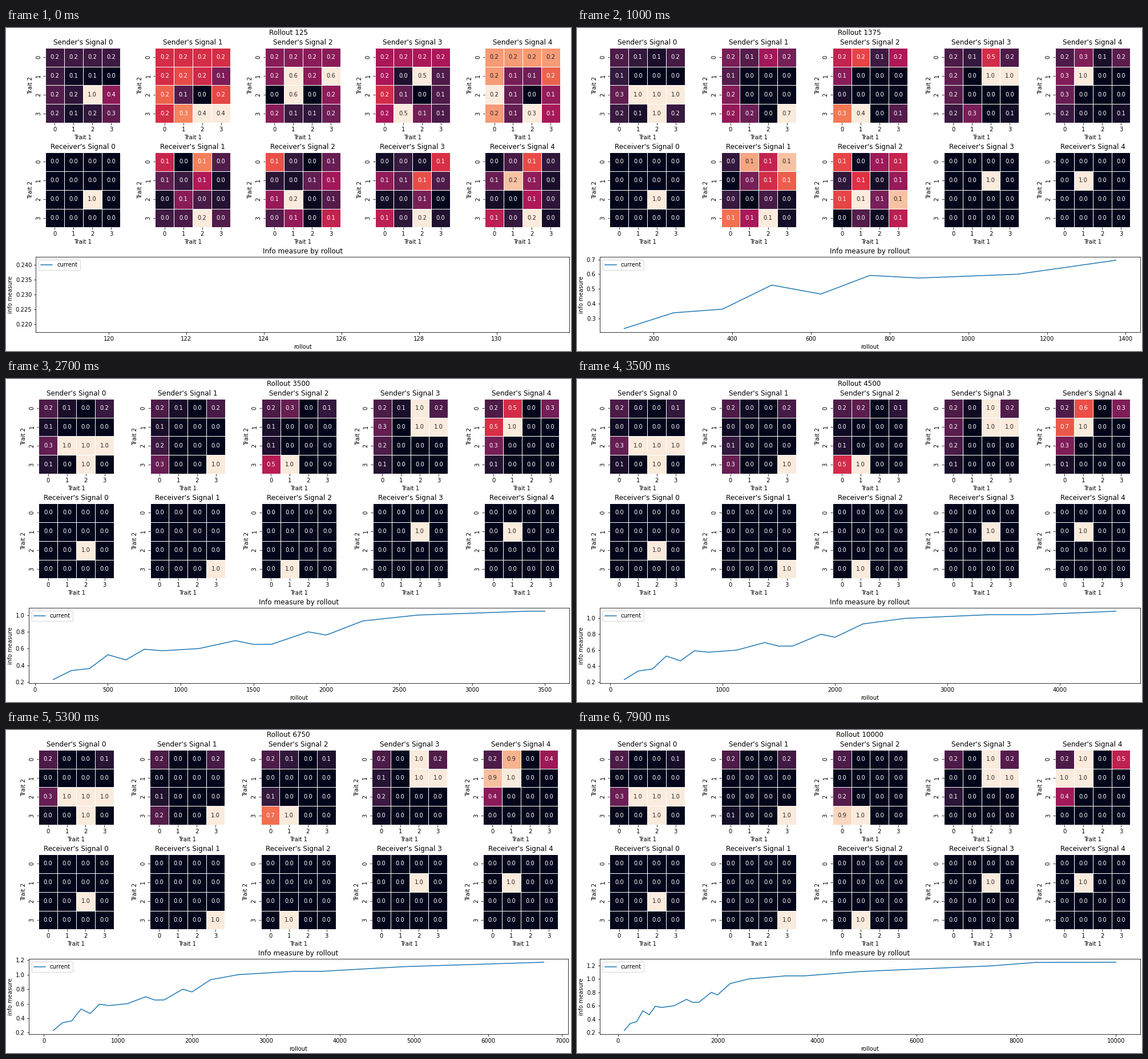
Animation, 990 px wide and 566 px high, one loop 8000 ms. Source, as a matplotlib script:

```python
import numpy as np
import matplotlib.pyplot as plt
from matplotlib.animation import FuncAnimation
from matplotlib.collections import LineCollection
from matplotlib.colors import LinearSegmentedColormap
from matplotlib.transforms import Affine2D

W, H, DPI = 990, 566, 72
FRAMES, INTERVAL, STEP = 80, 100, 125
SIGNALS, N, SIDE, GAP = 5, 4, 131.6, 28
CELL = SIDE / N
ROW_TOPS = (34.6, 217.8)
CHART_TOP, LEFT_EDGE, RIGHT_EDGE, DIGIT = 401.0, 39.7, 987.2, 6.36

plt.rcParams.update({"font.family": "DejaVu Sans", "font.size": 10})
ROCKET = LinearSegmentedColormap.from_list("warm", [
    "#03051a", "#35193e", "#701f57", "#ad1759",
    "#e13342", "#f37651", "#f6b48f", "#faebdd"])

# Each signal ends up naming one home cell, settled from a given frame on.
HOME = [(2, 2), (3, 3), (3, 1), (1, 2), (1, 1)]
SETTLED = [0, 15, 17, 3, 5]

# Inner cells: the signal leading at first, and the one that wins.
LEADER = [[2, 3, 2], [2, 0, 0], [3, 1, 1]]
LEAD_SHARE = [.38, .37, .58, .47, .2]
OWNER = [[4, 3, 3], [0, 0, 0], [2, 0, 1]]

# Edge cells: slow wins as (owner, rival, duration), or a lasting mixture
# as (signals in use at first, final shares).
SLOW = {(0, 1): (4, 2, 65), (0, 2): (3, 1, 24),
        (1, 0): (4, 3, 62), (3, 0): (2, 1, 85)}
MIXED = {(0, 0): ([1, 1, 1, 1, 1], [.2, .2, .2, .2, .2]),
         (0, 3): ([1, 1, 1, 1, 1], [.06, .17, .02, .22, .48]),
         (2, 0): ([1, 1, 0, 1, 1], [.27, 0, .22, .12, .4])}

# Bends of the info curve: frame -> value.
INFO_BENDS = {0: .23, 1: .337, 2: .362, 3: .526, 4: .465, 5: .592, 6: .574,
              8: .6, 10: .695, 11: .65, 12: .652, 14: .8, 15: .762, 17: .93,
              20: 1, 26: 1.046, 29: 1.046, 38: 1.111, 59: 1.195, 66: 1.246,
              79: 1.249}
rollouts = STEP * np.arange(1, FRAMES + 1)
info = np.interp(range(FRAMES), list(INFO_BENDS), list(INFO_BENDS.values()))

rng = np.random.default_rng(4)


def leading_mix(leader):
    """Shares of all signals with one in front and the rest random."""
    share = LEAD_SHARE[leader]
    rest = (1 - share) * rng.dirichlet(np.full(SIGNALS - 1, 4))
    return np.insert(rest, leader, share)


def vague_guess(peak):
    """Random distribution over the cells with its largest value at peak."""
    grid = rng.dirichlet(np.full(N * N, 1.5)).reshape(N, N)
    top = np.unravel_index(grid.argmax(), grid.shape)
    grid[top], grid[peak] = grid[peak], grid[top]
    return grid


inner_start = {(r + 1, c + 1): leading_mix(LEADER[r][c])
               for r in range(N - 1) for c in range(N - 1)}
guesses = [[vague_guess((2, 1) if k == 2 else (3, 2)) for _ in range(2)]
           for k in range(SIGNALS)]


def progress(i, duration):
    return min(1, i / duration) if duration else 1


def sender_policies(i):
    grids = np.zeros((SIGNALS, N, N))
    for cell, start in inner_start.items():
        owner = OWNER[cell[0] - 1][cell[1] - 1]
        delay = 0 if cell == HOME[owner] else 5
        done = progress(i, SETTLED[owner] + delay) ** 2
        grids[(slice(None), *cell)] = start * (1 - done)
        grids[(owner, *cell)] += done
    for cell, (owner, rival, duration) in SLOW.items():
        done = progress(i, duration)
        rest = .8 * (1 - done)
        grids[(slice(None), *cell)] = rest * (1 - done) / (SIGNALS - 1)
        grids[(rival, *cell)] += rest * done
        grids[(owner, *cell)] = 1 - rest
    for cell, (used, final) in MIXED.items():
        start = np.array(used) / sum(used)
        done = progress(i, FRAMES - 1)
        grids[(slice(None), *cell)] = start + (np.array(final) - start) * done
    return grids


def receiver_policies(i):
    grids = []
    for (first, later), home, settled in zip(guesses, HOME, SETTLED):
        sure = np.clip((i - settled + 2) / 2, 0, 1)
        grid = (first + (later - first) * progress(i, 10)) * (1 - sure)
        grid[home] += sure
        grids.append(grid)
    return grids


def text_color(rgb):
    linear = np.where(rgb <= .03928, rgb / 12.92, ((rgb + .055) / 1.055) ** 2.4)
    return ".15" if linear @ [.2126, .7152, .0722] > .408 else "white"


fig = plt.figure(figsize=(W / DPI, H / DPI), dpi=DPI, facecolor="white")
canvas = fig.add_axes([0, 0, 1, 1])
canvas.axis("off")
canvas.set_autoscale_on(False)
suptitle = canvas.text(W / 2, 2.5, "", size=12, ha="center", va="top")
shifts = [Affine2D() for _ in range(SIGNALS)]


class HeatMap:
    def __init__(self, title, column, top):
        place = shifts[column] + canvas.transData
        edges = np.arange(N + 1) * CELL
        mids = edges[:-1] + CELL / 2
        bottom = top + SIDE
        self.mesh = canvas.pcolormesh(edges, top + edges, np.zeros((N, N)),
                                      cmap=ROCKET, edgecolor="white",
                                      linewidth=.5, transform=place)

        def label(x, y, text, **style):
            return canvas.text(x, y, text, transform=place, **style)

        self.cells = [label(x, top + y, "", ha="center", va="center")
                      for y in mids for x in mids]
        label(SIDE / 2, top - 6, title, size=12, ha="center", va="baseline")
        label(SIDE / 2, bottom + 21, "Trait 1", ha="center", va="top")
        label(-21, top + SIDE / 2, "Trait 2", ha="center", va="bottom",
              rotation=90, rotation_mode="anchor")
        ticks = []
        for k, m in enumerate(mids):
            label(m, bottom + 7, str(k), ha="center", va="top")
            label(-7, top + m, str(k), ha="right", va="center", rotation=90)
            ticks += [[(m, bottom), (m, bottom + 3.5)],
                      [(-3.5, top + m), (0, top + m)]]
        canvas.add_collection(LineCollection(ticks, colors="black",
                                             linewidths=.8, transform=place),
                              autolim=False)

    def show(self, grid):
        self.mesh.set_array(grid)
        self.mesh.set_clim(grid.min(), grid.max())
        colors = self.mesh.to_rgba(grid.ravel())[:, :3]
        for text, value, rgb in zip(self.cells, grid.flat, colors):
            text.set_text(f"{value:.1f}")
            text.set_color(text_color(rgb))


maps = [HeatMap(f"{role}'s Signal {k}", k, top)
        for role, top in zip(("Sender", "Receiver"), ROW_TOPS)
        for k in range(SIGNALS)]
canvas.set(xlim=(0, W), ylim=(H, 0))

chart = fig.add_axes([.04, 1 - (CHART_TOP + SIDE) / H, .95, SIDE / H])
line, = chart.plot([], [], label="current")
chart.set_title("Info measure by rollout")
chart.set(xlabel="rollout", ylabel="info measure")
chart.legend(loc="upper left")


def visible_labels(axis):
    low, high = axis.get_view_interval()
    ticks = [t for t in axis.get_majorticklocs() if low <= t <= high]
    return ticks, axis.get_major_formatter().format_ticks(ticks)


def fit_layout():
    """Leave room for the widest y label and an overhanging last x label."""
    _, y_labels = visible_labels(chart.yaxis)
    left = LEFT_EDGE + DIGIT * (max(map(len, y_labels)) - 3)
    ticks, x_labels = visible_labels(chart.xaxis)
    low, high = chart.get_xlim()
    room = RIGHT_EDGE - DIGIT * len(x_labels[-1]) / 2 - left
    right = min(RIGHT_EDGE, left + room * (high - low) / (ticks[-1] - low))
    chart.set_position([left / W, 1 - (CHART_TOP + SIDE) / H,
                        (right - left) / W, SIDE / H])
    width = (right - left - GAP * (SIGNALS - 1)) / SIGNALS
    for k, shift in enumerate(shifts):
        shift.clear().translate(left + k * (width + GAP) + (width - SIDE) / 2, 0)


def update(i):
    suptitle.set_text(f"Rollout {rollouts[i]}")
    line.set_data(rollouts[:i + 1], info[:i + 1])
    chart.relim()
    chart.autoscale_view()
    fit_layout()
    for heat_map, grid in zip(maps, [*sender_policies(i), *receiver_policies(i)]):
        heat_map.show(grid)


anim = FuncAnimation(fig, update, frames=FRAMES, interval=INTERVAL,
                     repeat=True, repeat_delay=0)
plt.show()
```
